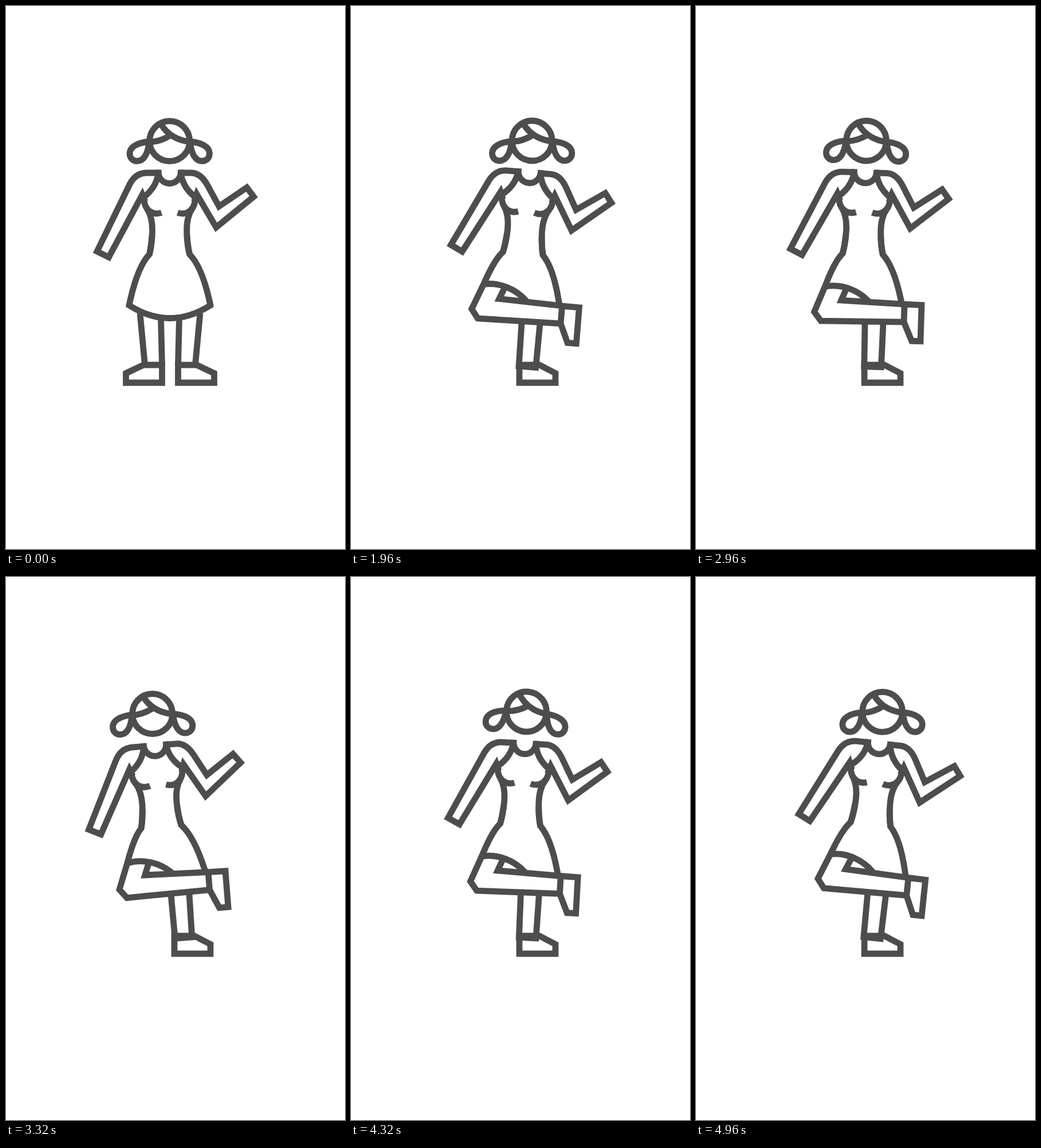
Write an HTML page that moves like this. It is 592 px wide and 947 px high and loops after 5 s.

```html
<!DOCTYPE html>
<html lang="en">
<head>
<meta charset="utf-8">
<title>Dancing figure</title>
<style>
html, body { margin: 0; height: 100%; overflow: hidden; background: #fff; }
svg { display: block; width: 100vw; height: 100vh; fill: none; stroke: #4d4d4d; stroke-width: 10.8; }
</style>
</head>
<body>
<svg viewBox="0 0 592 947">
  <defs>
    <path id="bun" d="M250 236.5C228 238.5 216 246.5 216 257.5C216 265.5 222 270.5 229 270.5C240 270.5 248 258.5 250 236.5"/>
    <g id="side">
      <path d="M266 291Q263 316 241 333C240 355 255 366 271.5 360.5"/>
      <path d="M246 353Q256 368 255.5 393Q255 415 250.5 433"/>
    </g>
    <g id="leg">
      <path d="M234 536L242.5 626M270.5 546L272.5 626"/>
      <path d="M272.5 626H240L209.5 640.5V657H272.5Z"/>
    </g>
  </defs>

  <g id="body">
    <g id="head">
      <circle cx="285.7" cy="235.6" r="35"/>
      <path d="M271 206.5Q287 233 322 237M250 237.5Q270 236.5 287 225.5"/>
      <use href="#bun"/>
      <use href="#bun" transform="matrix(-1 0 0 1 571.4 0)"/>
    </g>
    <path d="M266.2 285.5V290A19.5 19.5 0 0 0 305.2 290V285.5"/>
    <path d="M268 291H245C231 291.5 222 299 216 311L159 428L179.5 438L238 329L243 341"/>
    <path d="M304 291H324C338 291.5 346 302 352 313L372 349.5L420.5 316.5L432.5 332.5L367 386L333 328L328.5 341"/>
    <use href="#side"/>
    <use href="#side" transform="matrix(-1 0 0 1 571.2 0)"/>

    <path id="skirt" d="M255 400Q253.5 419 250.5 433Q229 455 215 522Q286 567 357 522Q343 455 320.5 433Q317 419 316 400"/>

    <g id="lifted">
      <path d="M255 400Q253.5 419 250.5 433Q237 447 222 490L204 536.5L216 552L361 549.5"/>
      <path d="M316 400Q317 419 320.5 433Q342 455 356.5 519"/>
      <path d="M221 492C250 485 280 497 298 515M258.5 495L250.5 515L361 518.5"/>
      <path d="M361 518.5L391 519V582H375.5L361 549.5Z"/>
      <path d="M293 551L294.1 629.3H323.8L325 551"/>
    </g>
  </g>

  <g id="standing">
    <use href="#leg"/>
    <use href="#leg" transform="matrix(-1 0 0 1 573 0)"/>
  </g>
  <path id="foot" d="M294 626H329L357 640.5V657H294Z"/>
</svg>
<script>
const LOOP = 5000, STEP = 40, START = 1560, BEAT = (LOOP - START) / 3, SWING = 6;
const $ = id => document.getElementById(id);

function bezier(x1, y1, x2, y2) {
  const at = (s, a, b) => 3 * (1 - s) * (1 - s) * s * a + 3 * (1 - s) * s * s * b + s * s * s;
  return x => {
    let lo = 0, hi = 1;
    for (let i = 0; i < 24; i++) {
      const mid = (lo + hi) / 2;
      if (at(mid, x1, x2) < x) lo = mid; else hi = mid;
    }
    return at(lo, y1, y2);
  };
}

const launch = bezier(.18, .167, .06, 1);
const swing = bezier(.33, 0, .05, 1);
const smooth = bezier(.33, 0, .67, 1);

// Keys: [beat, angle, easing into this key]
const bodyKeys = [[0, 0], [1, SWING, launch], [2, -SWING, swing], [3, SWING, swing]];
const headKeys = [[0, 0], [.5, -SWING, smooth], [2, SWING, smooth], [3, -SWING, smooth]];

function angleAt(keys, beat) {
  const i = keys.findIndex(key => key[0] > beat);
  const [from, a] = keys[i - 1], [to, b, ease] = keys[i];
  return a + (b - a) * ease((beat - from) / (to - from));
}

function draw(now) {
  const t = Math.floor(now % LOOP / STEP) * STEP;
  const dancing = t >= START;
  const beat = (t - START) / BEAT;
  const body = dancing ? angleAt(bodyKeys, beat) : 0;
  const head = dancing ? angleAt(headKeys, beat) : 0;
  $("body").setAttribute("transform", `rotate(${body} 308.5 616)`);
  $("head").setAttribute("transform", `rotate(${head} 285.7 235.6)`);
  for (const id of ["skirt", "standing"]) $(id).style.display = dancing ? "none" : "";
  for (const id of ["lifted", "foot"]) $(id).style.display = dancing ? "" : "none";
}

const begin = performance.now();
function tick() {
  draw(performance.now() - begin);
  requestAnimationFrame(tick);
}
tick();
</script>
</body>
</html>
```
